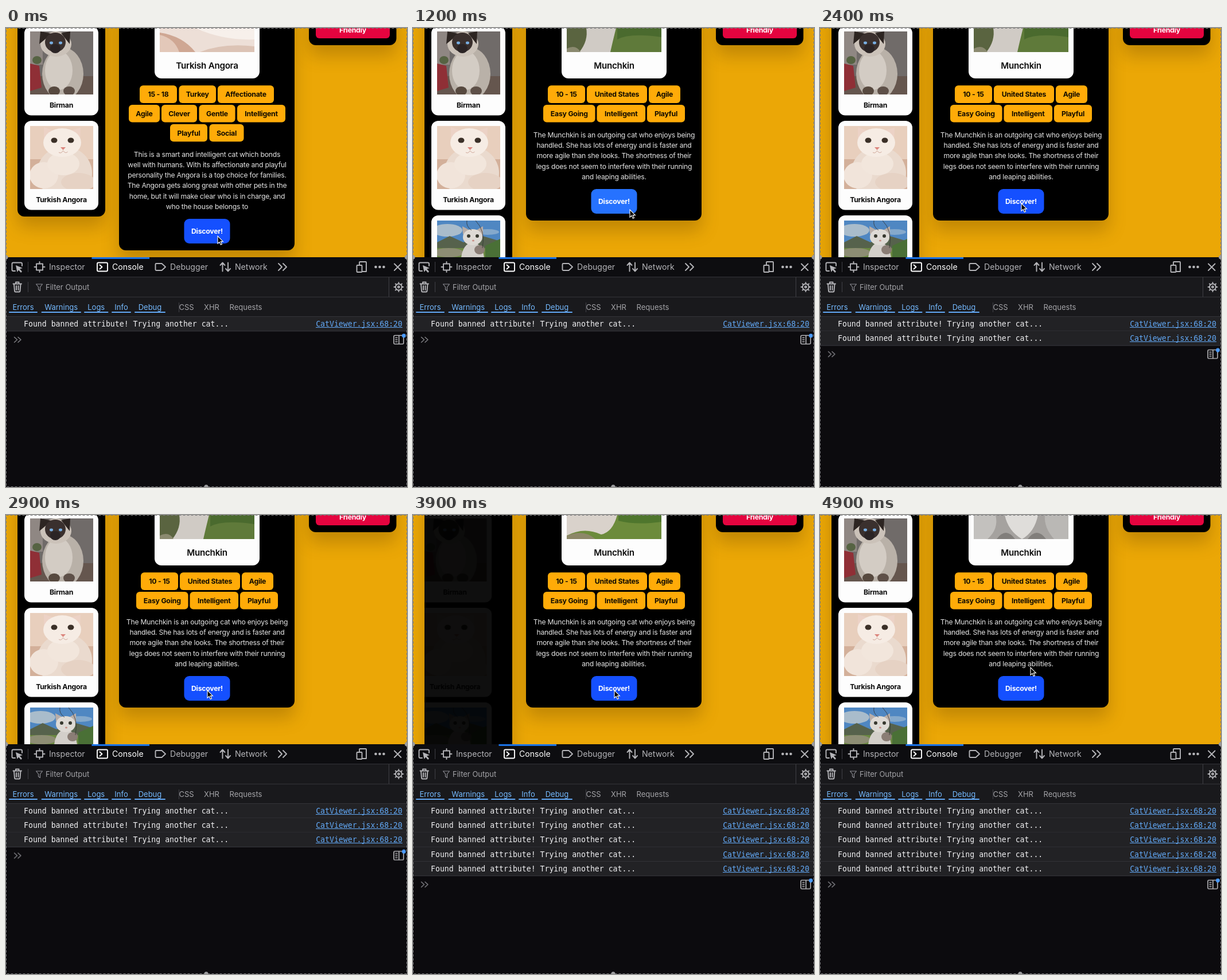
An HTML page that plays this animation: 699 by 801 pixels, repeating every 5 s.

```html
<!DOCTYPE html>
<html lang="en">
<head>
<meta charset="utf-8">
<title>Cat viewer</title>
<style>
html, body { margin: 0; width: 100%; height: 100%; overflow: hidden; background: #0c0b0e; }
svg { display: block; width: 699px; height: 801px; }
text { font-family: Inter, "Open Sans", sans-serif; }
.mid { text-anchor: middle; }
.bold { font-size: 12.3px; font-weight: 700; letter-spacing: -.25px; }
.name { font-size: 15.2px; font-weight: 600; letter-spacing: -.28px; }
.para { font-size: 12.2px; letter-spacing: -.23px; fill: #e4e4e4; }
.tab { font-size: 14.1px; fill: #b4b4b8; }
.active { fill: #fff; }
.bar { font-size: 13px; fill: #a4a4a8; }
.on { fill: #75baff; }
.log { font-family: "DejaVu Sans Mono", monospace; font-size: 13.2px; fill: #f0f0f2; }
.link { fill: #62a8f5; text-anchor: end; }
.panel { filter: drop-shadow(0 18px 15px rgba(60, 35, 0, .24)); }
.line { fill: none; stroke: #b4b4b8; stroke-width: 1.9; stroke-linejoin: round; stroke-linecap: round; }

.list { animation: list 5s infinite linear; }
@keyframes list {
  0%, 11.79% { opacity: 1; transform: none; }
  11.8% { opacity: 0; transform: translateX(-25px); animation-timing-function: ease-in-out; }
  21.8%, 76.29% { opacity: 1; transform: none; }
  76.3% { opacity: 0; transform: translateX(-25px); animation-timing-function: ease-in-out; }
  86.3%, 100% { opacity: 1; transform: none; }
}
.cursor { animation: cursor 5s infinite ease-in-out; }
@keyframes cursor {
  0%, 14% { transform: translate(369px, 363px); }
  23.5%, 25% { transform: translate(378px, 317px); }
  30%, 86% { transform: translate(351px, 306px); }
  97.5%, 100% { transform: translate(367px, 266px); }
}
.hover { animation: hover 5s infinite linear; }
@keyframes hover {
  0%, 20% { fill: #1550ff; }
  23%, 32% { fill: #2672ff; }
  35%, 100% { fill: #1550ff; }
}
.prompt { animation: prompt 5s infinite step-end; }
@keyframes prompt {
  0% { transform: none; }
  41.8% { transform: translateY(25.2px); }
  53.8% { transform: translateY(50.4px); }
  63.8% { transform: translateY(75.6px); }
  73.8%, 100% { transform: translateY(100.8px); }
}
</style>
</head>
<body>
<svg id="stage" viewBox="0 0 699 801" xmlns="http://www.w3.org/2000/svg"></svg>
<script>
const css = [];
const rect = (x, y, w, h, fill, r = 0, cls = '') =>
  `<rect x="${x}" y="${y}" width="${w}" height="${h}" rx="${r}" fill="${fill}" class="${cls}"/>`;
const text = (x, y, s, cls, fill) =>
  `<text x="${x}" y="${y}" class="${cls}"${fill ? ` fill="${fill}"` : ''}>${s}</text>`;
const oval = (x, y, rx, ry, fill) => `<ellipse cx="${x}" cy="${y}" rx="${rx}" ry="${ry}" fill="${fill}"/>`;
const shape = (d, fill) => `<path d="${d}" fill="${fill}"/>`;
const line = (d, style = '') => `<path class="line" d="${d}" style="${style}"/>`;
const group = (s, attrs) => `<g ${attrs}>${s}</g>`;

// Visible only between two times (ms) of the loop.
function during(from, to, s) {
  const id = 'w' + css.length;
  css.push(`@keyframes ${id}{0%{opacity:0}${from / 50}%{opacity:1}${to / 50}%{opacity:0}}` +
    `.${id}{animation:${id} 5s infinite step-end}`);
  return group(s, `class="${id}"`);
}

const SWAP = 590, SWAP2 = 3815, END = 5000;

// Thumbnails, 110 by 110
const birman =
  rect(0, 0, 110, 110, '#706b69') + rect(0, 0, 22, 58, '#8f8783') + rect(0, 78, 110, 32, '#65564e') +
  shape('M0 56L16 60 20 98 0 104Z', '#8f2f36') + oval(12, 50, 8, 7, '#566343') +
  oval(57, 74, 36, 46, '#b9b1a8') + oval(50, 68, 24, 34, '#d3ccc4') +
  oval(45, 22, 27, 22, '#cbc2b9') +
  shape('M16 22L18 0 38 4ZM54 3L70 0 69 22Z', '#2d2522') +
  oval(44, 19, 18, 17, '#3a302e') + oval(44, 30, 9, 8, '#2b2425') +
  oval(37, 20, 3, 2.4, '#78aee2') + oval(53, 20, 3, 2.4, '#78aee2') +
  oval(42, 104, 10, 8, '#57493f') + oval(68, 104, 10, 8, '#5e5048');

const angora =
  rect(0, 0, 110, 110, '#e8cfbd') + rect(0, 58, 110, 52, '#d3b09a') +
  oval(60, 82, 48, 46, '#eadace') + oval(24, 86, 25, 23, '#f1e4da') + oval(84, 98, 30, 16, '#e6d2c4') +
  oval(58, 66, 28, 20, '#f2e6dc') +
  shape('M24 28L24 2 46 10ZM66 9L88 3 87 30Z', '#ecd2c6') +
  oval(56, 29, 33, 25, '#f6ece4') +
  oval(42, 25, 5.5, 4.5, '#3b3028') + oval(71, 25, 5.5, 4.5, '#3b3028') +
  shape('M53 37h9l-4.5 5z', '#dc877f') +
  '<path d="M50 46q4 3 7.5-3q4 6 8 2" fill="none" stroke="#cfa698"/>';

const munchkin =
  rect(0, 0, 110, 110, '#4f87c2') + oval(18, 17, 26, 11, '#a9bccb') + oval(88, 20, 20, 5, '#85a9cc') +
  shape('M0 38L22 27 46 38 76 26 110 36V110H0Z', '#56624c') + rect(0, 48, 110, 62, '#6b8842') +
  shape('M84 44L110 32V70H84Z', '#4a7036') + oval(20, 56, 26, 8, '#8d8d74') +
  oval(62, 68, 20, 30, '#d3cfca') +
  shape('M45 24L44 10 57 17ZM68 17L80 10 80 28Z', '#b9aea8') +
  oval(62, 29, 17, 14, '#dedad5') + oval(55, 27, 3, 3, '#37382f') + oval(70, 27, 3, 3, '#37382f') +
  oval(63, 35, 2, 1.5, '#c98f86') + oval(74, 51, 9, 8, '#8a7d75') +
  '<path d="M52 0q-2 10 8 17M67 0q18 18 12 48" fill="none" stroke="#333" stroke-width=".8"/>';

const card = (y, pic, name) =>
  rect(32, y, 129, 155.5, '#fdfdfd', 12) +
  `<svg x="42" y="${y + 9}" width="110" height="110">${pic}</svg>` +
  text(96.5, y + 141.5, name, 'mid bold', '#0b0b0b');

function sidebar() {
  return during(0, SWAP, rect(20, -40, 153, 369, '#000', 12, 'panel')) +
    during(SWAP, END, rect(20, -40, 153, 520, '#000', 12, 'panel')) +
    group(group(card(-3, birman, 'Birman') + card(162, angora, 'Turkish Angora') +
      during(SWAP, END, card(327, munchkin, 'Munchkin')), 'class="list"'), 'clip-path="url(#side)"');
}

// Bottom strips of the large photo, 165 by 42
const photos = [
  [0, SWAP, rect(0, 0, 165, 42, '#eddfd7') + shape('M0 8Q40 14 62 42H0Z', '#cfa793') +
    shape('M0 12Q26 18 34 42H0Z', '#e3c8b9') + shape('M62 0Q110 22 165 20V0Z', '#f7f0eb') +
    shape('M70 42Q110 26 165 32V42Z', '#dcc3b5')],
  [SWAP, 790, rect(0, 0, 165, 42, '#e9dad2') + shape('M0 0H30Q50 20 90 42H0Z', '#cdb4a8') +
    shape('M0 12Q40 16 62 42H0Z', '#e2d2ca') + shape('M50 0Q100 30 165 28V0Z', '#f4ebe6') +
    shape('M100 42Q130 30 165 34V42Z', '#d6bdb0')],
  [790, SWAP2, rect(0, 0, 165, 42, '#5f7a3a') + shape('M0 0H38L28 42H0Z', '#5a6440') +
    shape('M88 0H165V16Q110 8 88 20Z', '#4a6a2e') + shape('M34 0H86Q80 24 76 42H22Q38 22 34 0Z', '#d0cbc5') +
    shape('M0 36Q16 28 24 42H0Z', '#8b8a70')],
  [SWAP2, 4090, rect(0, 0, 165, 42, '#6c8b3b') + shape('M90 0H165V12Q120 18 90 10Z', '#4f762d') +
    shape('M0 0H88Q80 30 60 34Q30 20 0 36Z', '#d9d2cb') + shape('M0 36Q30 24 50 42H0Z', '#8d8868')],
  [4090, END, rect(0, 0, 165, 42, '#a5a29f') + shape('M54 0H112Q106 30 84 42Q60 28 54 0Z', '#dfddda') +
    shape('M0 0H38Q44 24 24 42H0Z', '#c3c1be') + shape('M124 0H165V42H140Q122 22 124 0Z', '#bab8b5') +
    shape('M40 42Q56 20 72 42ZM94 42Q110 20 126 42Z', '#817e7b')]
];

function detail(bottom, name, rows, lines, hover) {
  let s = rect(197, -40, 306, bottom + 40, '#000', 12, 'panel') +
    rect(259, -40, 183, 128, '#fdfdfd', 12) + text(350.5, 71.3, name, 'mid name', '#0b0b0b');
  rows.forEach((row, i) => row.forEach(([x, w, label]) => {
    const y = 100.3 + i * 33.7;
    s += rect(x, y, w, 30.6, '#ffab08', 6) + text(x + w / 2, y + 20, label, 'mid bold', '#120c00');
  }));
  const top = 123.5 + rows.length * 33.7;
  lines.forEach((l, i) => s += text(350.5, top + i * 18.28, l, 'mid para'));
  return s + rect(310.5, bottom - 55, 80, 43, '#1550ff', 9, hover) +
    text(350.5, bottom - 29, 'Discover!', 'mid bold', '#fff');
}

const first = detail(388, 'Turkish Angora', [
  [[233, 65, '15 - 18'], [301.5, 64.5, 'Turkey'], [369, 98, 'Affectionate']],
  [[214, 54, 'Agile'], [271, 62, 'Clever'], [336.5, 63, 'Gentle'], [403, 84, 'Intelligent']],
  [[286, 65, 'Playful'], [354.5, 60, 'Social']]
], [
  'This is a smart and intelligent cat which bonds',
  'well with humans. With its affectionate and playful',
  'personality the Angora is a top choice for families.',
  'The Angora gets along great with other pets in the',
  'home, but it will make clear who is in charge, and',
  'who the house belongs to'
], '');

const second = detail(336, 'Munchkin', [
  [[235, 65, '10 - 15'], [303, 105, 'United States'], [411, 55, 'Agile']],
  [[227, 90.5, 'Easy Going'], [320.5, 84.5, 'Intelligent'], [408, 66, 'Playful']]
], [
  'The Munchkin is an outgoing cat who enjoys being',
  'handled. She has lots of energy and is faster and',
  'more agile than she looks. The shortness of their',
  'legs does not seem to interfere with their running',
  'and leaping abilities.'
], 'hover');

function page() {
  return rect(0, 0, 699, 401, '#eba706') + sidebar() +
    during(0, SWAP, first) + during(SWAP, END, second) +
    group(photos.map(p => during(...p)).join(''), 'transform="translate(268)"') +
    rect(528, -40, 152.5, 70, '#000', 12, 'panel') + rect(540, -20, 129, 38, '#e5043f', 6) +
    text(604.5, 7.5, 'Friendly', 'mid bold', '#fff');
}

function tabs() {
  return rect(0, 400, 699, 34, '#0d0d10') + rect(0, 434, 699, 70, '#19191c') +
    rect(149.5, 400, 100.5, 3, '#1a73e8') +
    [434, 469, 503].map(y => rect(0, y, 699, 1, '#343439')).join('') +
    rect(38, 408, 1, 18, '#404046') + rect(38, 443, 1, 18, '#404046') + rect(667, 435, 1, 34, '#404046') +
    line('M16 424H12.5Q10.5 424 10.5 422V411.5Q10.5 409.5 12.5 409.5H26Q28 409.5 28 411.5V415') +
    shape('M17 414L29 419 24 420.5 28 425 26 427 22 422.5 19.5 426Z', '#b4b4b8') +
    line('M53 411.5h11v11H53zM58.5 408v3M58.5 423v3M49.5 417h3M64.5 417h3') +
    line('M161 409.5h14q2 0 2 2v11q0 2-2 2h-14q-2 0-2-2v-11q0-2 2-2zM163.5 413.5l4 3.5-4 3.5', 'stroke:#fff') +
    line('M262 411h9.5l6.5 6-6.5 6H262q-1.5 0-1.5-1.5v-9q0-1.5 1.5-1.5z') +
    line('M377.5 424.5V410M373.5 414l4-4.5 4 4.5M387 409.5V424M383 420l4 4.5 4-4.5') +
    line('M475 411l6 6-6 6M483 411l6 6-6 6') +
    line('M616 413v-4q0-1 1-1h10q1 0 1 1v16h-7M612.5 414h7q1 0 1 1v10q0 1-1 1h-7q-1 0-1-1v-10q0-1 1-1z') +
    [644.5, 651.5, 658.5].map(x => oval(x, 417, 2.3, 2.3, '#b4b4b8')).join('') +
    line('M677 411.5l11.5 11.5M688.5 411.5L677 423') +
    text(75, 422.2, 'Inspector', 'tab') + text(185, 422.2, 'Console', 'tab active') +
    text(286, 422.2, 'Debugger', 'tab') + text(399, 422.2, 'Network', 'tab');
}

function filters() {
  const on = [['Errors', 5, 55], ['Warnings', 61.5, 131], ['Logs', 136, 178.5], ['Info', 184, 218], ['Debug', 224, 278]];
  const teeth = [0, 45, 90, 135, 180, 225, 270, 315]
    .map(a => `<path class="line" d="M0-6V-8" transform="rotate(${a})"/>`).join('');
  return line('M12.5 446.5h14.5M17 446v-2.5h5.5v2.5M14 447l1 12q.2 1.5 1.5 1.5h6.5q1.3 0 1.5-1.5l1-12M18 450v7M21.5 450v7') +
    line('M52.5 447h11l-4 5v6.5l-3-2V452z', 'stroke:#8a8a90;stroke-width:1.2') +
    text(69, 457, 'Filter Output', 'bar') +
    group(`<circle class="line" r="5.5"/><circle class="line" r="1.5"/>${teeth}`, 'transform="translate(684.5 452)"') +
    on.map(([s, a, b]) => text((a + b) / 2, 492, s, 'mid bar on') + rect(a, 495, b - a, 2, '#62a8f5', 1)).join('') +
    rect(301, 479, 1, 17, '#404046') +
    text(314.5, 492, 'CSS', 'mid bar') + text(358.5, 492, 'XHR', 'mid bar') + text(418, 492, 'Requests', 'mid bar');
}

function logs() {
  return [0, 2090, 2690, 3190, 3690].map((at, i) => {
    const y = 504 + i * 25.2;
    return during(at, END, rect(0, y, 699, 25.2, '#222225') + rect(0, y + 24.4, 699, 1, '#38383d') +
      text(31, y + 17, 'Found banned attribute! Trying another cat...', 'log') +
      text(691, y + 17, 'CatViewer.jsx:68:20', 'log link') +
      rect(540, Math.round(y + 18), 151, 1, '#62a8f5'));
  }).join('') + group(
    line('M14.5 539.5l5 4.5-5 4.5M21 539.5l5 4.5-5 4.5', 'stroke:#85858a;stroke-width:1.4') +
    line('M678 536.5h13q2 0 2 2v11q0 2-2 2h-13q-2 0-2-2v-11q0-2 2-2zM685 537v14M679 540.5h3M679 544h3M679 547.5h3',
      'stroke-width:1.6') +
    oval(693.5, 537, 3.4, 3.4, '#4a9bff'), 'class="prompt"');
}

const frame =
  '<rect x=".5" y=".5" width="698" height="800" fill="none" stroke="#77777a" stroke-dasharray="4 3"/>' +
  [[0, 400], [698.5, 400], [349, 800.5]].map(([x, y]) => oval(x, y, 3.5, 3.5, '#9a9a9c')).join('');

const cursor = group('<path d="M0 0V13.2L3.1 10.4 5.3 15.3 7.5 14.3 5.3 9.6H9.4Z" ' +
  'fill="#000" stroke="#fff" stroke-width="1.1"/>', 'class="cursor"');

document.getElementById('stage').innerHTML =
  '<clipPath id="side"><rect x="20" y="0" width="153" height="401"/></clipPath>' +
  page() + rect(0, 400, 699, 401, '#0c0b0e') + tabs() + filters() + logs() + frame + cursor;
document.head.appendChild(document.createElement('style')).textContent = css.join('\n');
</script>
</body>
</html>
```
